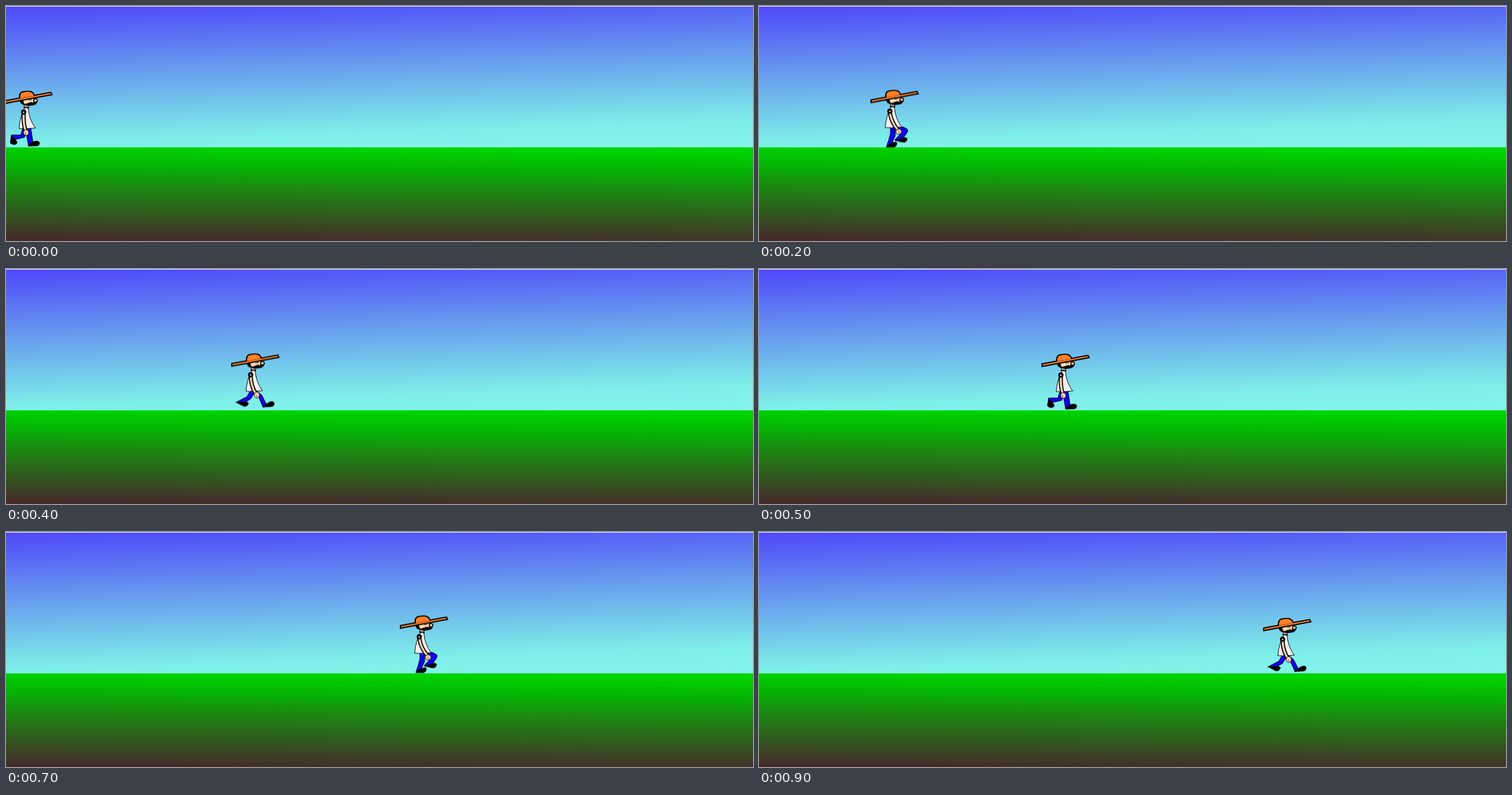
An HTML page without scripts for the animation above (1000 ms loop, 1267 by 399 pixels).

```html
<!DOCTYPE html>
<html lang="en">
<head>
<meta charset="utf-8">
<title>Walking man</title>
<style>
html, body { margin: 0; width: 100%; height: 100%; overflow: hidden; background: #fff; }
svg { display: block; width: 100%; height: 100%; }

.man { animation: walk 1s step-end infinite; }
@keyframes walk {
  0% { transform: translate(0, 0); }
  10% { transform: translate(96px, -.8px); }
  20% { transform: translate(192px, -1.5px); }
  30% { transform: translate(289px, -1px); }
  40% { transform: translate(385px, -.5px); }
  50% { transform: translate(482px, 0); }
  60% { transform: translate(576px, -1.2px); }
  70% { transform: translate(671px, -2.2px); }
  80% { transform: translate(765px, .6px); }
  90% { transform: translate(858px, 2px); }
}

/* five poses, each shown for a fifth of a stride */
.pose { visibility: hidden; animation: pose .5s step-end infinite; }
.p1 { animation-delay: -.4s; }
.p2 { animation-delay: -.3s; }
.p3 { animation-delay: -.2s; }
.p4 { animation-delay: -.1s; }
@keyframes pose {
  0% { visibility: visible; }
  20%, 100% { visibility: hidden; }
}

.legs { fill: #1400f0; stroke: #000; stroke-width: 1; stroke-linejoin: round; }
.shoe { fill: #000; }
.hat { fill: #ff7f27; stroke: #000; stroke-width: 2; }
.skin { fill: #fbd5b0; stroke: #000; }
.sleeve { fill: none; stroke: #000; stroke-width: 7; }
.limb { fill: none; stroke: #fbd5b0; stroke-width: 3.4; }
</style>
</head>
<body>
<svg viewBox="0 0 1267 399" preserveAspectRatio="none">
  <defs>
    <linearGradient id="sky" gradientUnits="userSpaceOnUse" x1="0" y1="0" x2="8.3" y2="278">
      <stop offset="0" stop-color="#4f47fa"/>
      <stop offset=".43" stop-color="#689fee"/>
      <stop offset=".84" stop-color="#7eefe8"/>
      <stop offset="1" stop-color="#86f4ec"/>
    </linearGradient>
    <linearGradient id="grass" gradientUnits="userSpaceOnUse" x1="0" y1="238" x2="-1.3" y2="400">
      <stop offset="0" stop-color="#00d400"/>
      <stop offset=".2" stop-color="#04b404"/>
      <stop offset=".4" stop-color="#1a8c10"/>
      <stop offset="1" stop-color="#48262c"/>
    </linearGradient>
    <path id="a0" d="M30 183Q29 198 33 211"/>
    <path id="a1" d="M30 183Q31 199 37 211"/>
    <path id="a2" d="M30 183Q33 200 43 211"/>
    <path id="a3" d="M31 183Q34 200 45 211"/>
    <path id="a4" d="M30 183Q31 200 38 211"/>
  </defs>

  <rect y="1" width="1267" height="240" fill="url(#sky)"/>
  <rect y="240" width="1267" height="159" fill="url(#grass)"/>

  <g class="man">
    <g class="legs">
      <g class="pose p0">
        <path d="M29 206L37 213 31 223 19 226 9 226 9 219 25 219z"/>
        <path class="shoe" d="M9 221Q15 223 19 232Q17 236 12 235Q6 233 7.500 231z"/>
        <path d="M34 206L42 207 46 233 38 237 35 219z"/>
        <path class="shoe" d="M38 238V236L45 231Q54 227 57 232Q57 237 52 237.500z"/>
      </g>
      <g class="pose p1">
        <path d="M38 206L47 209 51 217 46 223 31 227 24 226 25 220 38 216z"/>
        <path class="shoe" d="M23 222Q30 224 34 232Q33 236 28 236Q22 235 22 232z"/>
        <path d="M33 206L42 207 43 225 39 236 31 239 34 222z"/>
        <path class="shoe" d="M31 239.500L38 234Q48 228 50 233Q51 237 47 239z"/>
      </g>
      <g class="pose p2">
        <path d="M43 206L53 207 60 211 60 215 54 224 47 229 38 229 49 218 44 212z"/>
        <path class="shoe" d="M39 230L48 227Q57 223 59.500 227Q59 231 55 233Q50 233 45 231z"/>
        <path d="M31 207L39 208 39 222 34 233 24 241 28 229 31 218z"/>
        <path class="shoe" d="M24 241L31 235Q40 231 42 234Q42 239 38 241z"/>
      </g>
      <g class="pose p3">
        <path d="M46 207L55 209 64 214 72 220 66 228 54 219 44 214z"/>
        <path class="shoe" d="M66 228L73 217Q78 212 81 217Q83 223 79 224z"/>
        <path d="M31 207L40 208 38 225 30 232 16 238 29 221z"/>
        <path class="shoe" d="M15 238.500L28 230Q34 228 34 233Q34 237 30 238z"/>
      </g>
      <g class="pose p4">
        <path d="M30 206L37 210 30 221 20 227 5 227 24 217z"/>
        <path class="shoe" d="M5 226.500L20 226Q27 226 26 230Q24 234 19 234z"/>
        <path d="M39 206L49 215 57 231 51 235 44 219z"/>
        <path class="shoe" d="M50 235L59 228Q68 223 70 228Q70 234 65 234z"/>
      </g>
    </g>

    <path d="M31 167H38V174H31z" class="skin"/>
    <path d="M32 173Q24 186 22 208Q36 209 50 207Q39 193 37.500 172z" fill="#f0f0f0" stroke="#000"/>
    <path d="M30 171.500L39 173" stroke="#000" stroke-width="2"/>

    <path class="skin" d="M28 157L47 154 48 162 44 168 32 168 28 164z"/>
    <path d="M23 158L29 157Q29 164 33 168Q25 169 23 160z"/>
    <path d="M37 165Q42 162 46 164Q51 161 53 164Q50 169 43 169Q34 171 30 167z"/>
    <path d="M38 160L44 159" stroke="#000" stroke-width=".8"/>
    <ellipse class="skin" cx="50" cy="160.500" rx="3.200" ry="2.800" stroke-width="1.600"/>
    <path class="hat" d="M-2 161L76 146.500 78 150.500 -2 165.500z"/>
    <path class="hat" d="M23 157Q22 146 30 145.500Q46 142 48 152.500" />

    <g class="pose p0">
      <use href="#a0" class="sleeve"/><use href="#a0" class="limb"/>
      <ellipse class="skin" cx="34" cy="215" rx="4.500" ry="5"/><path d="M33 214V219" stroke="#000" stroke-width=".7"/>
    </g>
    <g class="pose p1">
      <use href="#a1" class="sleeve"/><use href="#a1" class="limb"/>
      <ellipse class="skin" cx="39" cy="215" rx="4.500" ry="5"/><path d="M38 214V219" stroke="#000" stroke-width=".7"/>
    </g>
    <g class="pose p2">
      <use href="#a2" class="sleeve"/><use href="#a2" class="limb"/>
      <ellipse class="skin" cx="45" cy="215" rx="5" ry="4.500"/><path d="M44 214L47 218" stroke="#000" stroke-width=".7"/>
    </g>
    <g class="pose p3">
      <use href="#a3" class="sleeve"/><use href="#a3" class="limb"/>
      <ellipse class="skin" cx="47.500" cy="214.500" rx="5" ry="4.500"/><path d="M46 214L49 218" stroke="#000" stroke-width=".7"/>
    </g>
    <g class="pose p4">
      <use href="#a4" class="sleeve"/><use href="#a4" class="limb"/>
      <ellipse class="skin" cx="40.500" cy="214.500" rx="4.500" ry="5"/><path d="M39 214L41 218" stroke="#000" stroke-width=".7"/>
    </g>
    <circle cx="30" cy="180" r="4.500"/>
    <circle cx="30" cy="180.500" r="1.200" fill="#f0f0f0"/>
  </g>
</svg>
</body>
</html>
```
